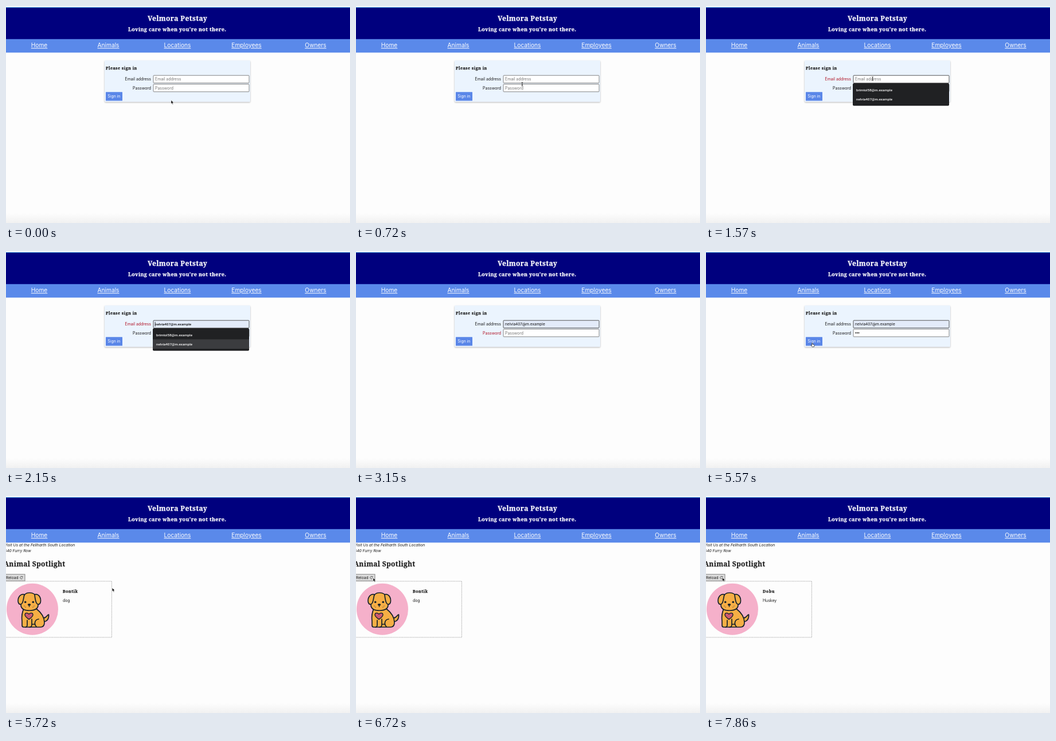
Recreate the animation shown at these times as an HTML page. Size 600 px wide and 379 px high, loop 8000 ms.

```html
<!DOCTYPE html>
<html lang="en">
<head>
<meta charset="utf-8">
<title>Kennel sign in</title>
<style>
  html, body { margin: 0; width: 100%; height: 100%; overflow: hidden; background: #fdfdfd; }
  svg { display: block; width: 100%; height: 100%; }
  text { font: 6.9px Inter, "Open Sans", sans-serif; fill: #1a1a1a; white-space: pre; }
  .slab { font-family: "Noto Serif", serif; font-weight: 800; color: #222; fill: currentColor; stroke: currentColor; stroke-width: .25px; }
  .light { color: #fff; }
  .small { font-size: 7px; letter-spacing: .5px; }
  .nav text { font-size: 10.2px; fill: #fff; text-anchor: middle; text-decoration: underline; text-decoration-thickness: .7px; }
  .menu { font: 500 6.2px Roboto, "Liberation Sans", sans-serif; }
  .place { font-size: 6.7px; font-style: italic; }
  .hint { fill: #757575; }
  .end { text-anchor: end; }
  .mid { text-anchor: middle; }
  .ink { stroke: #14202b; stroke-width: 1.7; stroke-linecap: round; stroke-linejoin: round; }
</style>
</head>
<body>
<svg viewBox="0 0 600 379" preserveAspectRatio="none">
  <defs>
    <linearGradient id="foot" x1="0" y1="0" x2="0" y2="1">
      <stop offset="0" stop-color="#fdfdfd"/><stop offset="1" stop-color="#f1f1f1"/>
    </linearGradient>
    <filter id="soft" x="-5%" y="-10%" width="110%" height="125%">
      <feDropShadow dx="0" dy="1.2" stdDeviation="1.3" flood-color="#000" flood-opacity=".32"/>
    </filter>
  </defs>

  <rect width="600" height="379" fill="#fdfdfd"/>
  <rect y="362" width="600" height="17" fill="url(#foot)"/>
  <rect width="600" height="2" fill="#f1f5f9"/>
  <rect y="2" width="600" height="1" fill="#3f8fd6"/>
  <rect y="3" width="600" height="55" fill="#00007e"/>
  <rect y="57.8" width="600" height="23.6" fill="#5a89ea"/>
  <text class="slab light mid" x="299" y="25.5" style="font-size:12px;letter-spacing:.4px">Velmora Petstay</text>
  <text class="slab light mid" x="298.7" y="44.4" style="font-size:9px;letter-spacing:.36px">Loving care when you’re not there.</text>
  <g class="nav" id="nav"></g>

  <g id="login">
    <rect x="172" y="95" width="254" height="72.3" rx="1.5" fill="#ebf4fe" filter="url(#soft)"/>
    <text class="slab small" x="174" y="111">Please sign in</text>
    <text class="end" id="mailLabel" x="253" y="130">Email address</text>
    <text class="end" id="passLabel" x="253" y="145.5">Password</text>
    <rect id="mailBox" x="257" y="121.2" width="167" height="13.2" rx="1"/>
    <rect x="257" y="136.6" width="167" height="13.2" rx="1" fill="#fff" stroke="#858585"/>
    <text id="mailText" x="260" y="130"></text>
    <text id="passHint" class="hint" x="260" y="145.5">Password</text>
    <g id="dots" fill="#111"></g>
    <path id="caret" d="M260.2 123.8v8" stroke="#111" stroke-width=".8"/>
    <rect x="174" y="150.2" width="29" height="15.3" rx=".6" fill="#5a86e8"/>
    <text class="mid" x="188.4" y="160.3" style="fill:#fff">Sign in</text>
    <g id="menu">
      <rect x="256" y="135" width="168" height="39.3" rx="2" fill="#202123"/>
      <rect id="pick" x="256" y="154.3" width="168" height="16.4" fill="#3b3c3f"/>
      <text class="menu" x="262" y="148.8" style="fill:#f3f3f3">brimtol58@m.example</text>
      <text class="menu" x="262" y="164.8" style="fill:#f3f3f3">nelvia407@m.example</text>
    </g>
  </g>

  <g id="home">
    <text class="place" x="-3" y="88.3">Visit Us at the Fellharth South Location</text>
    <text class="place" x="-3" y="97.5">640 Furry Row</text>
    <text class="slab" x="-4" y="123.3" style="font-size:12px;letter-spacing:.3px">Animal Spotlight</text>
    <rect x="-4" y="136.8" width="37" height="11.4" fill="#dcdcdc" stroke="#777" stroke-width=".9"/>
    <text x="0" y="144.9" style="font-size:6.7px">Reload</text>
    <path d="M28.6 141.3a2.2 2.2 0 1 0 .3 2.1M29 140.2v1.5h-1.5" fill="none" stroke="#333" stroke-width=".7"/>
    <rect x="-4" y="148.9" width="188.4" height="98" fill="none" stroke="#999" stroke-width=".9" stroke-dasharray="1.5 1.2"/>
    <circle cx="46" cy="197.8" r="45" fill="#f5b0ca"/>
    <g class="ink" fill="#f6ae45">
      <path d="M65 219c7 1 10-5 9.500-12c-4 1-3 6-9.500 6"/>
      <path d="M31 197c-3 6-4 14-3 22v7c0 2 1 3 3 3H60c5 0 7-3 7-8c0-10-5-17-14-24z"/>
      <path d="M37 217v8c0 3-1 4-3 4M45 215v10c0 3-2 4-4 4M53 228c-4-3-4-12 4-13M46 224h5" fill="none"/>
      <path d="M30 178c1-6 5-9 11-9s11 3 12 9c1 4 3 7 3 12c0 7-6 10-15 10s-15-3-15-10c0-5 3-8 4-12z"/>
      <path d="M32 172c-6-2-11 4-11 11c0 4 2 7 5 6c4-1 4-8 5-12z"/>
      <path d="M50 172c6-2 10.500 4 10.500 11c0 4-2 7-5 6c-4-1-4-8-5-12z"/>
      <path d="M40.500 191v2.500" fill="none" stroke-width="1.200"/>
      <path d="M40 215.500c-4-3-7-5-7-8c0-4 5-4 7-1c2-3 7-3 7 1c0 3-3 5-7 8z" fill="#cd5a70" stroke-width="1.300"/>
    </g>
    <g fill="#14202b">
      <ellipse cx="40.5" cy="189.8" rx="2.7" ry="1.9"/>
      <circle cx="33.7" cy="185.3" r="1.8"/><circle cx="47.3" cy="185.3" r="1.8"/>
      <circle cx="32" cy="192" r=".6"/><circle cx="34" cy="194" r=".6"/>
      <circle cx="49" cy="192" r=".6"/><circle cx="47" cy="194" r=".6"/>
    </g>
    <text class="slab small" id="petName" x="99" y="169"></text>
    <text id="petKind" x="99" y="185.3"></text>
  </g>

  <g id="pointer">
    <path id="arrow" d="M0 0v6.2l1.4-1.2 1 2.3 1.1-.5-1-2.2h1.9z" fill="#000" stroke="#fff" stroke-width=".5"/>
    <path id="beam" d="M-1.3-3.3Q0-3.3 0-2.4Q0-3.3 1.3-3.3M0-2.4V2.4M-1.3 3.3Q0 3.3 0 2.4Q0 3.3 1.3 3.3M-.8 .9h1.6" fill="none" stroke="#222" stroke-width=".8"/>
    <path id="hand" d="M-.6 .4q.7-.9 1.3 0v2.2l2.4.6q.8.3.6 1.2l-.6 2.6h-3.3l-2-2.6q-.2-1.1 1.6 0z" fill="#fff" stroke="#111" stroke-width=".65"/>
  </g>
</svg>
<script>
const LOOP = 8000, TICK = 1000 / 7;
const $ = id => document.getElementById(id);
const show = (id, on) => $(id).setAttribute("display", on ? "inline" : "none");
const set = (id, attrs) => { for (const k in attrs) $(id).setAttribute(k, attrs[k]); };
const ease = u => u * u * (3 - 2 * u);

$("nav").innerHTML = ["Home", "Animals", "Locations", "Employees", "Owners"]
  .map((name, i) => `<text x="${58 + i * 120.5}" y="72.3">${name}</text>`).join("");
$("dots").innerHTML = [0, 1, 2]
  .map(i => `<circle cx="${261.3 + i * 2.6}" cy="143" r=".95"/>`).join("");

// time, x, y of the mouse
const path = [
  [0, 288, 164.5], [140, 288, 164.5], [1000, 290.5, 127], [4280, 290.5, 127],
  [5430, 185.3, 160.4], [5710, 185.3, 160.4], [6570, 30, 143],
  [6720, 30, 143], [7150, 28.6, 142.5], [8000, 28.6, 142.5]
];

function mouseAt(t) {
  const i = path.findIndex((p, n) => n && t <= p[0]);
  const [a, b] = [path[i - 1], path[i]];
  const u = ease((t - a[0]) / (b[0] - a[0]));
  return [a[1] + (b[1] - a[1]) * u, a[2] + (b[2] - a[2]) * u];
}

function drawMouse(t, atHome) {
  const [x, y] = mouseAt(t);
  const inBox = !atHome && x > 257 && x < 424 && y > 121 && y < 150;
  const onButton = !atHome && x > 174 && x < 203 && y > 150 && y < 166;
  show("pointer", t < 1850 || t > 4420);
  set("pointer", { transform: `translate(${x} ${y})` });
  show("beam", inBox);
  show("hand", onButton);
  show("arrow", !inBox && !onButton);
}

function draw(time) {
  const t = Math.floor((time + 2) / TICK) * TICK;
  const between = (a, b) => t >= a - 8 && t < b - 8;
  const atHome = t > 5700;
  const preview = between(2000, 2430), filled = t > 2420;
  const mailFocus = between(1150, 2860), passFocus = between(2860, 5430);

  show("login", !atHome);
  show("home", atHome);

  $("mailLabel").style.fill = mailFocus ? "#b01224" : "";
  $("passLabel").style.fill = passFocus ? "#b01224" : "";
  set("mailBox", {
    fill: preview || filled ? "#e3ebf9" : "#fff",
    stroke: mailFocus || filled ? "#555" : "#858585"
  });
  const mail = $("mailText");
  mail.textContent = preview || filled ? "nelvia407@m.example" : "Email address";
  mail.setAttribute("class", preview ? "menu" : filled ? "" : "hint");
  mail.style.fontSize = filled ? "6.5px" : "";
  mail.style.fill = preview || filled ? "#111" : "";
  show("caret", between(1150, 1430) || between(1860, 2430));
  show("menu", between(1150, 2430));
  show("pick", preview);

  const typed = [3570, 3860, 4150].filter(k => t >= k - 8).length;
  show("passHint", !typed);
  [...$("dots").children].forEach((dot, i) => dot.setAttribute("display", i < typed ? "inline" : "none"));

  const next = t > 7420;
  $("petName").textContent = next ? "Dobu" : "Bontik";
  $("petKind").textContent = next ? "Huskey" : "dog";

  drawMouse(t, atHome);
}

const start = performance.now();
function frame() {
  draw((performance.now() - start) % LOOP);
  requestAnimationFrame(frame);
}
frame();
</script>
</body>
</html>
```
